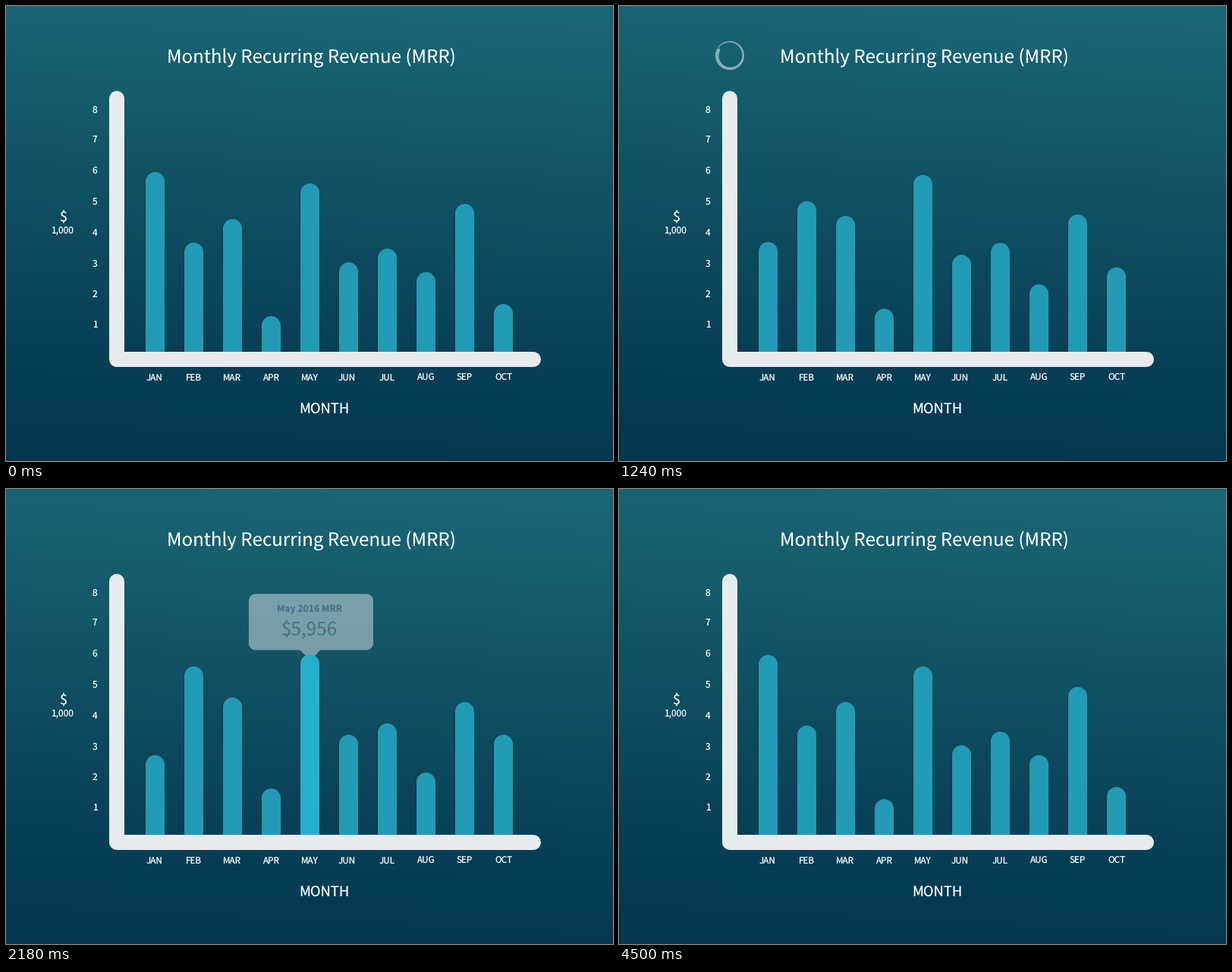
A matplotlib script that plays this animation: 800 by 600 pixels, repeating every 4.52 s.

```python
import numpy as np
import matplotlib.pyplot as plt
from matplotlib.animation import FuncAnimation
from matplotlib.patches import Polygon

W, H, DPI = 800, 600, 100
PX = 72 / DPI                      # points per pixel
STEP, LOOP = 20, 4520              # ms
BARS_END, TIP_START, TIP_END, RESET = 2000, 2100, 2500, 4500

LIGHT, TEAL, BRIGHT, INK = "#e7ebee", "#229bb6", "#2fd9ff", "#0d4a63"
MONTHS = "JAN FEB MAR APR MAY JUN JUL AUG SEP OCT".split()
LABEL_X = [196, 247, 298, 349, 400, 449, 502, 553, 604, 656.5]
TOP_A = np.array([219, 312, 281, 409, 234, 338, 320, 351, 261, 393])
TOP_B = np.array([351, 234, 275, 395, 218, 324, 309, 374, 281, 324])
TICK_Y = [424, 384, 344, 303, 262, 221, 180, 141]
MAY = 4

plt.rcParams["font.family"] = "Noto Sans CJK JP"
plt.rcParams["text.hinting"] = "none"

fig = plt.figure(figsize=(W / DPI, H / DPI), dpi=DPI)
ax = fig.add_axes([0, 0, 1, 1])


def clamp(p):
    return min(max(p, 0.0), 1.0)


U = np.linspace(0, 1, 201)
EASE_X = 1.26 * U * (1 - U) ** 2 + 1.74 * U ** 2 * (1 - U) + U ** 3
EASE_Y = 3 * U ** 2 - 2 * U ** 3


def ease_in_out(p):
    return np.interp(p, EASE_X, EASE_Y)


def ease_out(p, power):
    return 1 - (1 - p) ** power


def mix(a, b, p):
    a, b = (np.array(plt.matplotlib.colors.to_rgb(c)) for c in (a, b))
    return tuple(a + (b - a) * p)


def arc(cx, cy, r, start, stop, n=24):
    """Points on a circle; degrees run clockwise from the right."""
    a = np.radians(np.linspace(start, stop, n))
    return np.column_stack([cx + r * np.cos(a), cy + r * np.sin(a)])


def label(x, y, text, size, color="white", **kw):
    return ax.text(x, y, text, fontsize=size * PX, color=color,
                   ha="center", va="baseline", **kw)


def shape(points, color, z, alpha=1):
    return ax.add_patch(Polygon(points, closed=True, fc=color, ec="none",
                                lw=0, alpha=alpha, zorder=z))


def bar_points(i, top, dx=0):
    x = 184 + 51 * i + dx
    return np.vstack([arc(x + 12.5, top + 12.5, 12.5, 180, 360, 40),
                      [(x + 25, 460), (x, 460)]])


def bubble_points(dy):
    left, right, top, low, r = 320, 484, 132, 206, 9
    pts = np.vstack([
        arc(left + r, top + r, r, 180, 270), arc(right - r, top + r, r, 270, 360),
        arc(right - r, low - r, r, 0, 90),
        [(414.5, low), (401, low + 13.5), (387.5, low)],
        arc(left + r, low - r, r, 90, 180)])
    return pts + (0, dy)


def spinner_points(head):
    """Ring that tapers backwards from a rounded head."""
    cx, cy, r, thick = 146, 65.3, 19, 4.8
    s = np.linspace(0, 1, 90)
    a = np.radians(head - 352 * s)
    width = 1 + (thick - 1) * (1 - s)
    ray = np.column_stack([np.cos(a), np.sin(a)])
    outer = ray * r
    inner = ray * (r - width)[:, None]
    mid = ray[0] * (r - thick / 2)
    cap = arc(mid[0], mid[1], thick / 2, head + 180, head, 12)
    return np.vstack([outer, inner[::-1], cap]) + (cx, cy)


# Slightly tilted background gradient
yy, xx = np.mgrid[0:H, 0:W]
depth = (yy - 0.05 * (xx - W / 2)) / H
stops = np.linspace(0, 1, 5)
channels = [(24, 20, 14, 8, 3), (101, 90, 76, 64, 54), (117, 106, 96, 87, 80)]
back = np.dstack([np.interp(depth, stops, c) for c in channels])
ax.imshow(np.round(back).astype(np.uint8), extent=(0, W, H, 0),
          interpolation="nearest", zorder=0)

# Axes and labels
ax.plot([145.5, 145.5, 695], [121.5, 466, 466], color=LIGHT, lw=20 * PX,
        solid_capstyle="round", solid_joinstyle="round", zorder=4)
label(402.5, 75, "Monthly Recurring Revenue (MRR)", 24.1)
label(419.5, 538, "MONTH", 18.4)
label(75, 284, "$", 18)
label(74.5, 300, "1,000", 12)
for n, y in enumerate(TICK_Y, 1):
    label(117, y, str(n), 12)
for x, name in zip(LABEL_X, MONTHS):
    label(x, 494, name, 11.7)

# Moving parts
soft = [shape(bar_points(i, y, -2), "#222222", 1, 0.15) for i, y in enumerate(TOP_A)]
hard = [shape(bar_points(i, y, -1), "#333333", 1.5, 0.6) for i, y in enumerate(TOP_A)]
bars = [shape(bar_points(i, y), TEAL, 3) for i, y in enumerate(TOP_A)]
spinner = shape(spinner_points(0), "#a9bfd2", 3, 0)
bubble = shape(bubble_points(0), LIGHT, 2, 0)
caption = label(400, 156, "May 2016 MRR", 12.2, INK, weight="bold", zorder=2.5)
amount = label(400, 186, "$5,956", 24.3, INK, zorder=2.5)

ax.set_xlim(0, W)
ax.set_ylim(H, 0)
ax.set_aspect("auto")
ax.axis("off")


def update(frame):
    t = frame * STEP
    if t >= RESET:
        t = 0

    tops = TOP_A + (TOP_B - TOP_A) * ease_in_out(clamp(t / BARS_END))
    for i, top in enumerate(tops):
        soft[i].set_xy(bar_points(i, top + 0.5, -2))
        hard[i].set_xy(bar_points(i, top + 0.5, -1))
        bars[i].set_xy(bar_points(i, top))

    spinner.set_xy(spinner_points(8.5 + 0.545 * (t - 880)))
    spinner.set_alpha(0.8 * min(clamp((t - 40) / 240), clamp((1960 - t) / 240)))

    p = clamp((t - TIP_START) / (TIP_END - TIP_START))
    dy = 10 * (1 - ease_out(p, 2))
    bubble.set_xy(bubble_points(dy))
    caption.set_y(156 + dy)
    amount.set_y(186 + dy)
    for part in (bubble, caption, amount):
        part.set_alpha(ease_out(p, 3))
        part.set_visible(p > 0)
    bars[MAY].set_facecolor(mix(TEAL, BRIGHT, ease_out(p, 1.7)))


anim = FuncAnimation(fig, update, frames=LOOP // STEP, interval=STEP,
                     repeat=True, repeat_delay=0)
plt.show()
```
